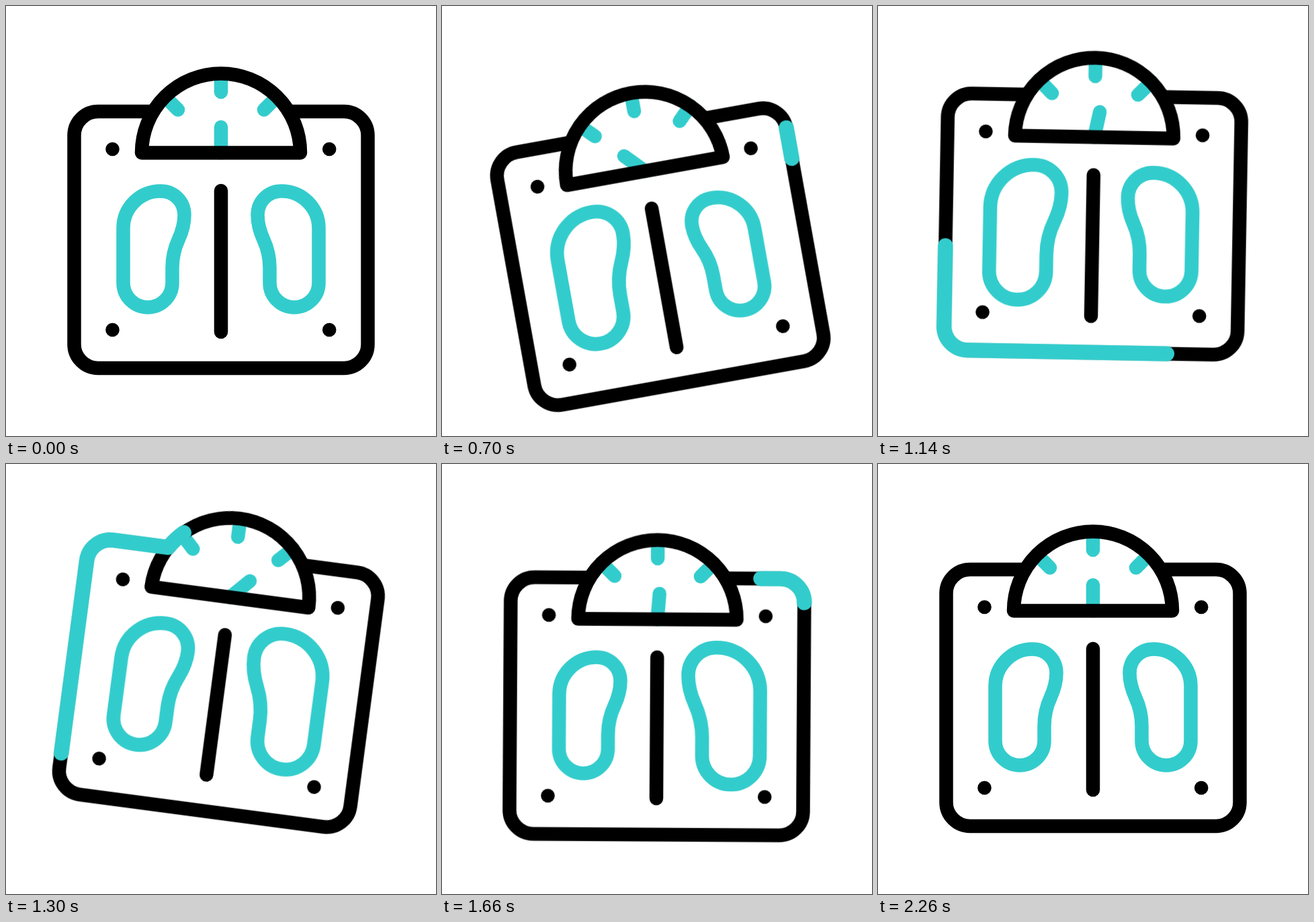
An HTML page without scripts that plays this animation: 640 by 640 pixels, repeating every 2.4 s.

```html
<!DOCTYPE html>
<html lang="en">
<head>
<meta charset="utf-8">
<title>Bathroom scale</title>
<style>
  html, body { margin: 0; width: 100%; height: 100%; overflow: hidden; background: #fff; }
  svg { display: block; width: 640px; height: 640px; }

  .line, .teal { fill: none; stroke: #000; stroke-width: 20.5; stroke-linecap: round; stroke-linejoin: round; }
  .teal { stroke: #33cccc; }

  .bounce, .tilt, .needle, .foot, .glow {
    animation: 2.4s cubic-bezier(.333, 0, .667, 1) infinite;
  }
  .bounce { animation-name: bounce; }
  .tilt   { animation-name: tilt; transform-origin: 320px 320px; }
  .needle { animation-name: needle; transform-origin: 320px 218.5px; }
  .foot   { transform-origin: 220px 362px; }
  .left   { animation-name: left; }
  .right  { animation-name: right; }
  .glow   { animation-name: run, stretch, show; stroke-width: 22.5; }

  @keyframes bounce {
    0%, 8.333% { transform: translateY(0); }
    29.167%    { transform: translateY(25.6px); }
    50%        { transform: translateY(-25.4px); }
    70%        { transform: translateY(12.8px); }
    93.75%, to { transform: translateY(0); }
  }
  @keyframes tilt {
    0%, 8.333%  { transform: rotate(0deg); }
    33.333%     { transform: rotate(-11deg); }
    58.333%     { transform: rotate(9deg); }
    75%         { transform: rotate(-3deg); }
    91.667%, to { transform: rotate(0deg); }
  }
  @keyframes needle {
    0%, 8.333% { transform: rotate(0deg); }
    33.333%    { transform: rotate(-47.5deg); }
    58.333%    { transform: rotate(50.5deg); }
    77.083%    { transform: rotate(-24deg); }
    93.75%, to { transform: rotate(0deg); }
  }

  /* the stroke thins as the foot grows, so its drawn weight stays even */
  @keyframes left {
    0%, 16.667% { transform: scale(1); stroke-width: 20.5; }
    39.583%     { transform: scale(1.225); stroke-width: 16.7; }
    62.5%, to   { transform: scale(1); stroke-width: 20.5; }
  }
  @keyframes right {
    0%, 39.583% { transform: scale(1); stroke-width: 20.5; }
    62.5%       { transform: scale(1.225); stroke-width: 16.7; }
    85.417%, to { transform: scale(1); stroke-width: 20.5; }
  }

  /* tail position, then length: the head leads the tail by 200 ms */
  @keyframes run {
    0%, 33.333% { stroke-dashoffset: 0; }
    75%, to     { stroke-dashoffset: -1000; }
  }
  @keyframes stretch {
    0%, 25%     { stroke-dasharray: 0 2000; animation-timing-function: cubic-bezier(.333, 0, .667, .385); }
    33.333%     { stroke-dasharray: 104 2000; animation-timing-function: cubic-bezier(.333, .667, .667, 1); }
    50%         { stroke-dasharray: 296 2000; animation-timing-function: cubic-bezier(.333, 0, .667, .333); }
    66.667%     { stroke-dasharray: 104 2000; animation-timing-function: cubic-bezier(.333, .615, .667, 1); }
    75%, to     { stroke-dasharray: 0 2000; }
  }
  @keyframes show {
    0%      { opacity: 0; animation-timing-function: step-end; }
    25.1%   { opacity: 1; animation-timing-function: step-end; }
    74.9%, to { opacity: 0; animation-timing-function: step-end; }
  }
</style>
</head>
<body>
<svg viewBox="0 0 640 640">
  <defs>
    <path id="sole" d="M174.5 412V331C174.5 300 199.5 275.5 230 275.5C250 275.5 265.5 291 265.5 311C265.5 324 262 336 257 347C250.5 361 247.5 374 247.5 390V412A36.5 36.5 0 0 1 174.5 412Z"/>
    <path id="dome" d="M202 218.5A118 118 0 0 1 438 218.5Z"/>
  </defs>
  <g class="bounce">
    <g class="tilt">
      <rect class="line" x="101.5" y="157" width="437" height="382" rx="35.5"/>
      <g>
        <circle cx="158.5" cy="213" r="10.3"/>
        <circle cx="481.2" cy="213" r="10.3"/>
        <circle cx="158.5" cy="482" r="10.3"/>
        <circle cx="481.2" cy="482" r="10.3"/>
      </g>
      <path class="line" d="M320 275V485"/>

      <use class="teal foot left" href="#sole"/>
      <g transform="translate(640) scale(-1 1)">
        <use class="teal foot right" href="#sole"/>
      </g>

      <use href="#dome" fill="#fff"/>
      <path class="teal" d="M320 101V128M236.6 135L256 154.5M403.4 135L384 154.5"/>
      <path class="teal needle" d="M320 218.5V180.3"/>
      <use class="line" href="#dome"/>

      <path class="teal glow" pathLength="1000" d="M538.5 192.5V503.5A35.5 35.5 0 0 1 503 539H137A35.5 35.5 0 0 1 101.5 503.5V192.5A35.5 35.5 0 0 1 137 157H219.3A118 118 0 0 1 420.7 157H503A35.5 35.5 0 0 1 538.5 192.5"/>
    </g>
  </g>
</svg>
</body>
</html>
```
